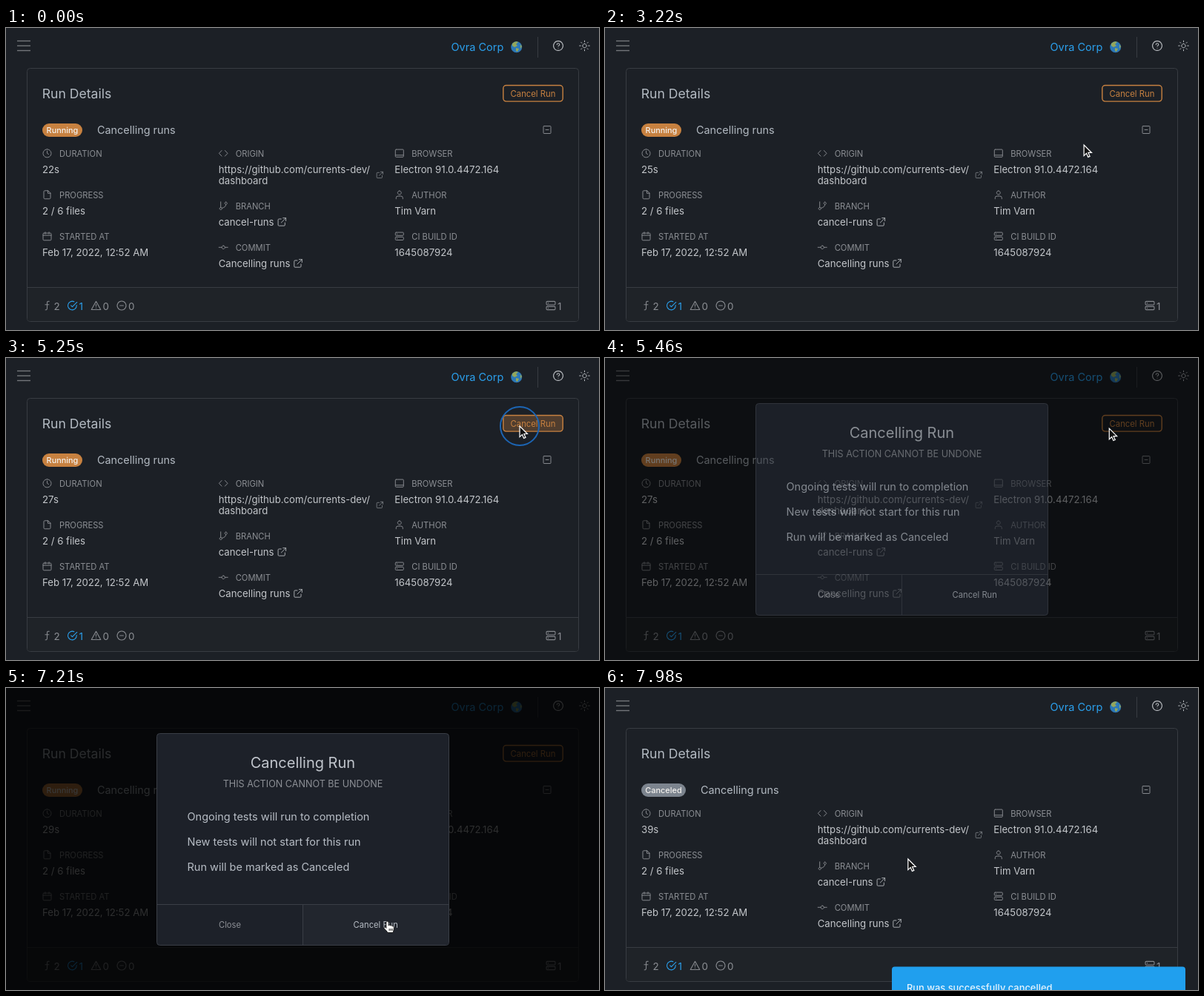
Animation, 800 px wide and 408 px high, one loop 8000 ms. Source, as an HTML page:

```html
<!DOCTYPE html>
<html lang="en">
<head>
<meta charset="utf-8">
<title>Cancelling runs</title>
<style>
  html, body { margin: 0; width: 100%; height: 100%; overflow: hidden; background: #1c2026; }
  svg { display: block; width: 100%; height: 100%; }
  text { font-family: Inter, Roboto, sans-serif; white-space: pre; }
  .icon { fill: none; stroke: #85888d; stroke-width: 1; stroke-linecap: round; stroke-linejoin: round; }
  .label { font-size: 11.2px; fill: #8c8f94; }
  .value { font-size: 13.2px; fill: #c3c6ca; }
  .count { font-size: 13.4px; fill: #8c8f94; }
  .mid { text-anchor: middle; }
</style>
</head>
<body>
<svg id="stage" viewBox="0 0 800 408"></svg>
<script>
const LOOP = 8000, STEP = 70;
const ORANGE = '#c78140', BLUE = '#2ba1ee', LINE = '#383c42';

// Icons are drawn in a 12 x 12 box.
const ICONS = {
  clock: 'M6 .5a5.5 5.5 0 1 0 .01 0M6 2.8V6l2 1.2',
  file: 'M7 .5H2.8Q1.5 .5 1.5 1.8V10.2Q1.5 11.5 2.8 11.5H9.2Q10.5 11.5 10.5 10.2V4ZV4H10.5',
  calendar: 'M1.6 1.8H10.4Q11.5 1.8 11.5 3V10.4Q11.5 11.5 10.4 11.5H1.6Q.5 11.5 .5 10.4V3Q.5 1.8 1.6 1.8M.5 4.8H11.5M3.5 .4V2.8M8.5 .4V2.8',
  code: 'M3.8 2.2L.2 6L3.8 9.8M8.2 2.2L11.8 6L8.2 9.8',
  branch: 'M2.5 .5V8M2.5 8a1.6 1.6 0 1 0 .01 0M9.5 .8a1.6 1.6 0 1 0 .01 0M9.5 4Q9.5 8 4.2 9',
  commit: 'M6 3.8a2.2 2.2 0 1 0 .01 0M0 6H3.8M8.2 6H12',
  screen: 'M1.5 .8H10.5Q11.5 .8 11.5 1.8V8.5H.5V1.8Q.5 .8 1.5 .8M.5 8.5V10Q.5 11 1.5 11H10.5Q11.5 11 11.5 10V8.5',
  person: 'M6 .7a2.5 2.5 0 1 0 .01 0M1.5 11.5V10.2Q1.5 7.8 4 7.8H8Q10.5 7.8 10.5 10.2V11.5',
  server: 'M1.5 .8H10.5Q11.5 .8 11.5 1.8V4Q11.5 5 10.5 5H1.5Q.5 5 .5 4V1.8Q.5 .8 1.5 .8M1.5 7H10.5Q11.5 7 11.5 8V10.2Q11.5 11.2 10.5 11.2H1.5Q.5 11.2 .5 10.2V8Q.5 7 1.5 7M2.7 2.9H3M2.7 9.1H3',
  link: 'M5 2H2Q.8 2 .8 3.2V10Q.8 11.2 2 11.2H8.8Q10 11.2 10 10V7M7.4 .7H11.3V4.6M11.3 .7L5 7',
  minusBox: 'M1.8 1H10.2Q11 1 11 1.8V10.2Q11 11 10.2 11H1.8Q1 11 1 10.2V1.8Q1 1 1.8 1M4 6H8',
  flaky: 'M8.5 .8Q6 0 6 3V9Q6 11.6 3.8 11.3M3.6 4.8H8.2',
  check: 'M11.3 5.5V6A5.4 5.4 0 1 1 8.2 1.1M11.8 1.8L6 7.6L4.3 5.9',
  warn: 'M6 .8L11.8 11H.2ZM6 4.5V7M6 9V9.1',
  minus: 'M6 .5a5.5 5.5 0 1 0 .01 0M3.8 6H8.2',
  help: 'M6 .1a5.9 5.9 0 1 0 .01 0M4.4 4.6Q4.5 3 6 3T7.6 4.6Q7.6 5.6 6 6.5M6 8.7V8.8',
  sun: 'M6 3.3a2.7 2.7 0 1 0 .01 0M6-.8V.8M6 11.2V12.8M-.8 6H.8M11.2 6H12.8M1.2 1.2L2.3 2.3M9.7 9.7L10.8 10.8M1.2 10.8L2.3 9.7M9.7 2.3L10.8 1.2'
};

const icon = (name, x, y, size = 12, stroke = '#85888d') =>
  `<path class="icon" style="stroke:${stroke}" d="${ICONS[name]}" transform="translate(${x - size / 2} ${y - size / 2}) scale(${size / 12})"/>`;
const text = (str, x, y, attrs = '') => `<text x="${x}" y="${y}" ${attrs}>${str}</text>`;
const field = (name, label, value, x, y, id = '') =>
  icon(name, x + 6.5, y) + text(label, x + 23, y + 4.3, 'class="label"') +
  text(value, x, y + 27, `class="value" ${id}`);
const line = (x1, y1, x2, y2, color = LINE, w = 1) =>
  `<path d="M${x1} ${y1}L${x2} ${y2}" stroke="${color}" stroke-width="${w}"/>`;
const counter = (name, x, n, color) =>
  icon(name, x, 375, 13, color) + text(n, x + 9, 381, `class="count" ${color ? `style="fill:${color}"` : ''}`);

const header = [17.5, 24, 30.5].map(y => line(15, y, 33, y, '#73767a', 1.4)).join('') +
  text('Ovra Corp', 600.5, 31.3, `font-size="14.5" fill="${BLUE}"`) +
  `<circle cx="688.7" cy="25.7" r="7.5" fill="#2c78b8"/>
   <path d="M683 21Q687 17 691 19L688 22L690 24L686 26L683 24ZM688 27L692 28L690 32L688 31ZM694 22L696 25L694 28Z" fill="#93a65c"/>` +
  line(717.5, 12, 717.5, 40) + icon('help', 745, 24, 13, '#b9bcc0') + icon('sun', 780.5, 24, 12, '#b9bcc0');

const card = `<rect x="28.5" y="54.5" width="744" height="342" rx="4" fill="#1c2026" stroke="${LINE}"/>
  <path d="M29 351H772V393Q772 396 769 396H32Q29 396 29 393Z" fill="#1f2328"/>` +
  line(29, 350.5, 772, 350.5) +
  text('Run Details', 48.7, 95, 'font-size="17.6" fill="#b3bac2"') +
  `<g id="button"><rect id="buttonBox" x="670.8" y="77.5" width="80.4" height="21.6" rx="4" stroke-width="1.4"/>` +
  text('Cancel Run', 711, 92.7, 'class="mid" id="buttonText" font-size="11.3"') + '</g>' +
  '<rect id="badge" x="49" y="129" height="18" rx="9"/>' +
  text('', 0, 141.9, 'class="mid" id="badgeText" font-size="10.9" font-weight="500" fill="#f3f1ee"') +
  text('Cancelling runs', 0, 143, 'id="runTitle" font-size="14.4" fill="#b3bac2"') +
  icon('minusBox', 730, 137.5) +
  field('clock', 'DURATION', '', 49, 169.3, 'id="duration"') +
  field('file', 'PROGRESS', '2 / 6 files', 49, 225.3) +
  field('calendar', 'STARTED AT', 'Feb 17, 2022, 12:52 AM', 49, 281.3) +
  field('code', 'ORIGIN', 'https://github.com/currents-dev/', 286.7, 169.3) +
  text('dashboard', 286.7, 211.2, 'class="value"') + icon('link', 504.3, 198.5, 9.5) +
  field('branch', 'BRANCH', 'cancel-runs', 286.7, 240.3) + icon('link', 372.3, 262, 12, '#a6a9ad') +
  field('commit', 'COMMIT', 'Cancelling runs', 286.7, 296.3) + icon('link', 394, 318, 12, '#a6a9ad') +
  field('screen', 'BROWSER', 'Electron 91.0.4472.164', 524.3, 169.3) +
  field('person', 'AUTHOR', 'Tim Varn', 524.3, 225.3) +
  field('server', 'CI BUILD ID', '1645087924', 524.3, 281.3) +
  counter('flaky', 55.5, '2') + counter('check', 89.5, '1', BLUE) +
  counter('warn', 121.5, '0') + counter('minus', 156, '0') + counter('server', 735, '1');

const modal = `<g id="modal"><rect width="800" height="408" fill="#000" opacity=".77"/>
  <rect x="203.5" y="61.5" width="394" height="286" rx="4" fill="#1d2129" stroke="#3a3e46"/>
  <path id="confirm" d="M401 293H597V344Q597 347 594 347H401Z" fill="#22262e"/>` +
  line(204, 292.5, 597, 292.5, '#3a3e46') + line(400.5, 293, 400.5, 347, '#3a3e46') +
  text('Cancelling Run', 400.4, 107.8, 'class="mid" font-size="20" fill="#c0c5cc"') +
  text('THIS ACTION CANNOT BE UNDONE', 400.5, 134.3, 'class="mid" font-size="12.6" fill="#8c8f95"') +
  ['Ongoing tests will run to completion', 'New tests will not start for this run', 'Run will be marked as Canceled']
    .map((s, i) => text(s, 244.5, 178.7 + 33.9 * i, 'font-size="14.5" fill="#b7bdc5"')).join('') +
  text('Close', 302, 323.8, 'class="mid" font-size="11.2" fill="#8c8f95"') +
  text('Cancel Run', 498.7, 323.8, 'class="mid" font-size="11.2" fill="#b7bdc5"') + '</g>';

const overlay = `<g id="toast"><rect x="387" width="396" height="60" rx="4" fill="#209fee"/>` +
  text('Run was successfully cancelled', 407, 33, 'font-size="12.9" font-weight="500" fill="#e4f3fd"') + `</g>
  <circle id="ring" fill="none" stroke="#1c65b4" stroke-width="2"/>
  <g id="cursor">
    <path id="arrow" d="M0 0V14.6L3.4 11.4L5.6 16.4L8 15.4L5.8 10.5H10.4Z" fill="#111" stroke="#fff" stroke-width="1.2"/>
    <path id="hand" d="M-1.6 1.2Q0-.8 1.6 1.2V6L2 5.4Q3.6 4.6 4.4 6Q6 5.2 6.8 6.8Q8.6 6.2 8.8 8V11Q8.4 13 7.4 15.5H.6Q-1.5 12.5-4.4 9.8Q-5 7.6-3.2 7.8L-1.6 9.4ZM2.6 10V13M4.6 10V13M6.6 10V13" fill="#fff" stroke="#111" stroke-width=".9"/>
  </g>`;

document.getElementById('stage').innerHTML =
  '<rect width="800" height="408" fill="#1c2026"/>' + header + card + modal + overlay;

const parts = {};
document.querySelectorAll('[id]').forEach(el => parts[el.id] = el);
const set = (id, attrs) => Object.entries(attrs).forEach(([k, v]) => parts[id].setAttribute(k, v));
const show = (id, on) => set(id, { visibility: on ? 'visible' : 'hidden' });

const smooth = p => p * p * (3 - 2 * p);
const ramp = (t, from, to) => Math.min(1, Math.max(0, (t - from) / (to - from)));

// [time, x, y] of the pointer tip
const PATH = [
  [980, 806, 262], [1820, 628.5, 194.5], [2660, 628.5, 194.5], [3990, 674.5, 99],
  [4200, 675, 98.5], [4830, 693, 92], [5390, 693, 92], [5880, 463, 149],
  [6440, 514.5, 315], [7420, 514.5, 315], [7910, 408.8, 231]
];
function pointerAt(t) {
  const i = PATH.findIndex(k => k[0] > t);
  if (i === 0) return PATH[0].slice(1);
  if (i < 0) return PATH[PATH.length - 1].slice(1);
  const [a, b] = [PATH[i - 1], PATH[i]];
  const p = smooth(ramp(t, a[0], b[0]));
  return [a[1] + (b[1] - a[1]) * p, a[2] + (b[2] - a[2]) * p];
}

const CLICKS = [5040, 7210];
const DONE = 7630;

function draw(t) {
  const done = t >= DONE;
  const [x, y] = pointerAt(t);
  const open = ramp(t, 5320, 5530) * (1 - ramp(t, 7420, 7600));

  parts.duration.textContent = (done ? 39 : 22 + Math.floor(Math.max(0, t - 200) / 1000)) + 's';
  parts.badgeText.textContent = done ? 'Canceled' : 'Running';
  set('badge', { width: done ? 60 : 54, fill: done ? '#7c848e' : ORANGE });
  set('badgeText', { x: done ? 79 : 76 });
  set('runTitle', { x: done ? 129 : 123 });

  const hover = t >= 3920 && t < 5110;
  const pressed = t >= 5110 && t < 5320;
  show('button', !done);
  set('buttonBox', {
    fill: hover || pressed ? ORANGE : 'none',
    'fill-opacity': pressed ? 0.3 : 1,
    stroke: ORANGE
  });
  set('buttonText', { fill: hover ? '#f4ece4' : ORANGE });

  show('modal', open > 0);
  set('modal', { opacity: open });
  const confirming = t >= 6370 && t < 7420;
  show('confirm', confirming);

  const click = CLICKS.find(c => t > c && t < c + 350);
  show('ring', click !== undefined);
  if (click !== undefined) {
    set('ring', {
      cx: x, cy: y,
      r: 6 + 20 * ramp(t, click, click + 210),
      opacity: 1 - ramp(t, click + 210, click + 350)
    });
  }

  show('cursor', t >= 980);
  set('cursor', { transform: `translate(${x} ${y})` });
  const pointing = hover || confirming;
  set('hand', { display: pointing ? 'inline' : 'none' });
  set('arrow', { display: pointing ? 'none' : 'inline' });

  set('toast', { transform: `translate(0 ${408 - 31.5 * ramp(t, 7840, 7980)})` });
  show('toast', t > 7840);
}

const start = performance.now();
function tick() {
  const t = (performance.now() - start) % LOOP;
  draw(Math.floor(t / STEP) * STEP);
  requestAnimationFrame(tick);
}
tick();
</script>
</body>
</html>
```
